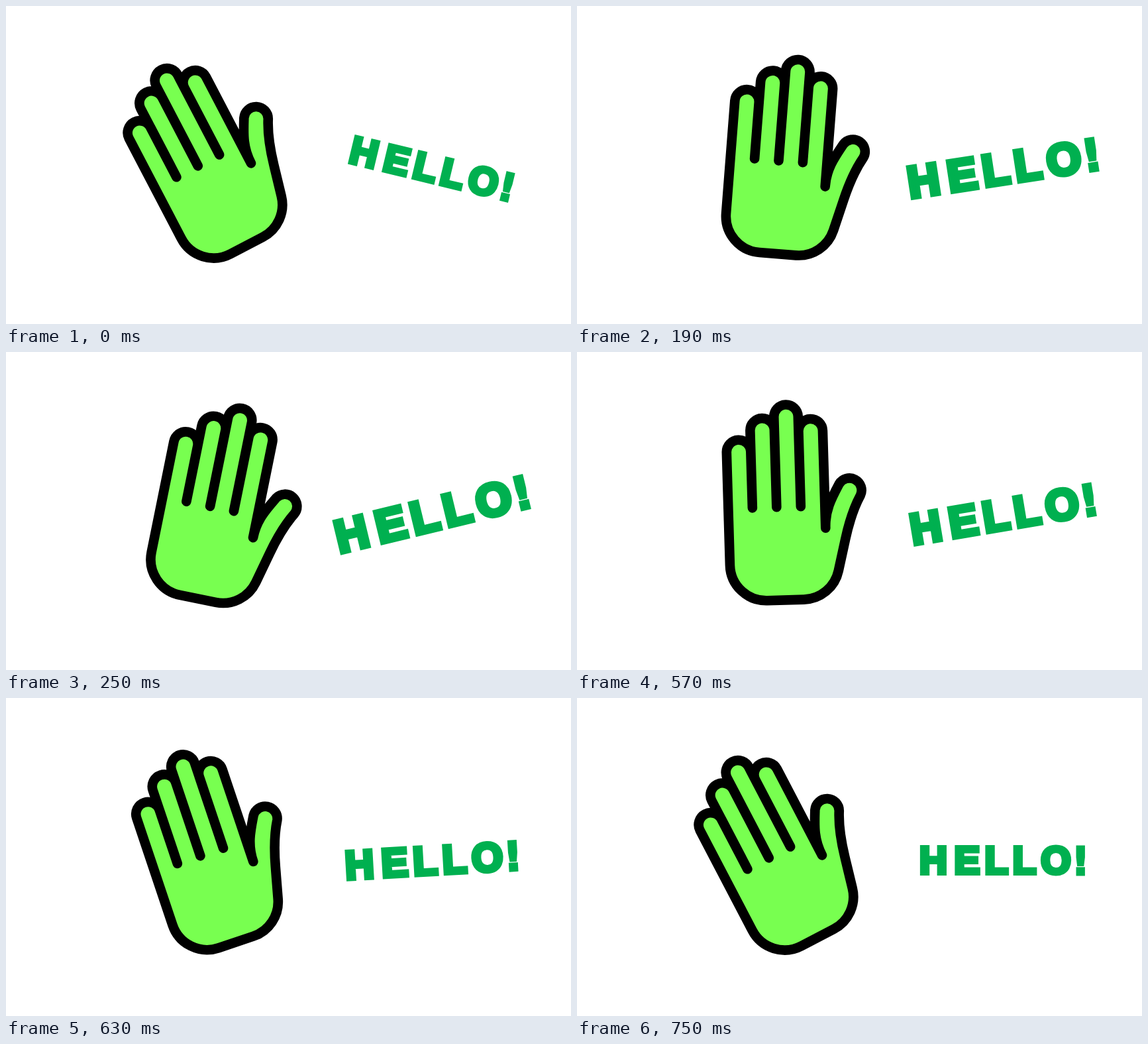
Animation of 853x480 px, one loop 950 ms. Source, as an HTML page:

```html
<!DOCTYPE html>
<html lang="en">
<head>
<meta charset="utf-8">
<title>Hello</title>
<style>
  html, body { margin: 0; width: 100%; height: 100%; overflow: hidden; background: #fff; }
  svg { display: block; width: 100%; height: 100%; }
  #hand { fill: #78ff50; stroke: #000; stroke-width: 14.6; stroke-linejoin: round; }
  #word {
    font: 700 58px "Liberation Sans", Arial, sans-serif;
    fill: #00b050; stroke: #00b050; stroke-width: 6;
  }
  #word .mark { font: 700 59px "DejaVu Sans", sans-serif; stroke-width: 3; }
</style>
</head>
<body>
<svg viewBox="0 0 853 480">
  <!-- drawn upright around the point the hand turns on -->
  <path id="hand" d="M-81.8 56.5 V-114
    a18.25 18.25 0 0 1 36.5 0 V-29 V-145.5
    a18.25 18.25 0 0 1 36.5 0 V-29 V-165
    a18.25 18.25 0 0 1 36.5 0 V-29 V-142.5
    a18.25 18.25 0 0 1 36.5 0 V4.6
    C64 -22 74.5 -40 86.5 -61.1
    A18.25 18.25 0 0 1 118.1 -42.9
    C107.1 -23.9 98.2 3.6 93.4 23
    L81.7 69.8
    A55 55 0 0 1 28.3 111.5
    H-26.8
    A55 55 0 0 1 -81.8 56.5 Z"/>
  <!-- centred on the point the word turns on -->
  <text id="word" y="20.3" x="-124.9 -72.4 -26.6 15.8 58.6">HELLO<tspan class="mark" x="104.7" y="21.8">!</tspan></text>
</svg>
<script>
  const LOOP = 950, STEP = 60;
  const SWING_RIGHT = 130, SWING_LEFT = 570;
  const EASE = [0, 0.37, 0.78, 0.95, 1];

  const hand = document.getElementById('hand');
  const word = document.getElementById('word');
  const mix = (a, b, p) => a + (b - a) * p;

  // Eased progress of a swing, held in steps of 60 ms
  function swing(t, start) {
    const step = Math.floor((t - start) / STEP) + 1;
    return EASE[Math.max(0, Math.min(4, step))];
  }

  function place(node, x, y, angle, scale = 1) {
    node.setAttribute('transform', `translate(${x} ${y}) rotate(${angle}) scale(${scale})`);
  }

  function draw(t) {
    const back = t >= SWING_LEFT;
    const p = swing(t, back ? SWING_LEFT : SWING_RIGHT);
    const away = back ? 1 - p : p;
    place(hand, 311, 263, mix(-27.6, 13.5, away));
    place(word, 642, 245, mix(back ? 0 : 13.5, -15, away), mix(1, 1.2, away));
  }

  const begin = performance.now();
  function tick() {
    draw((performance.now() - begin) % LOOP);
    requestAnimationFrame(tick);
  }
  draw(0);
  requestAnimationFrame(tick);
</script>
</body>
</html>
```
